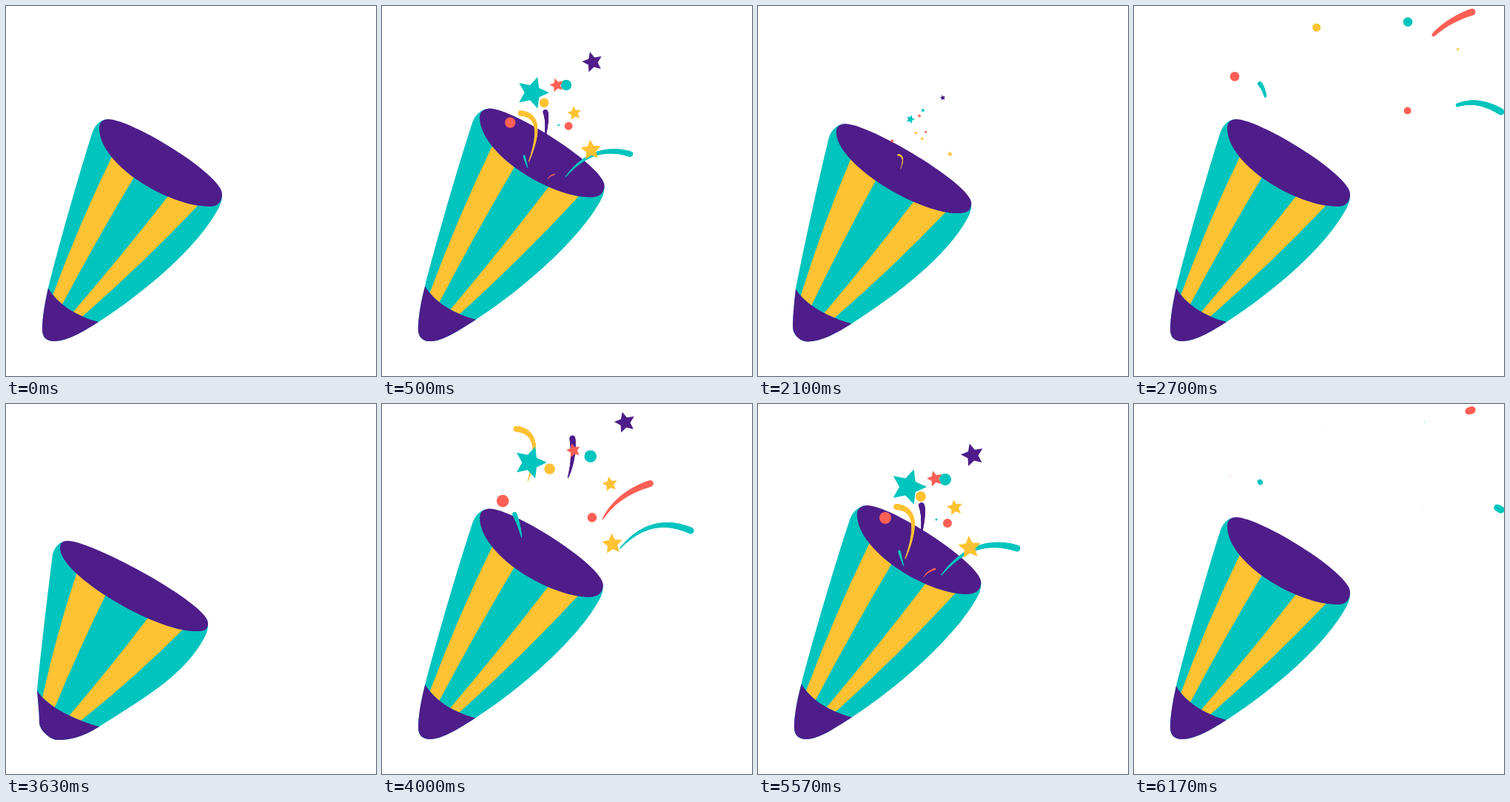
Write an HTML page with a canvas that moves like this. It is 500 px wide and 500 px high and loops after 6.63 s.

```html
<!DOCTYPE html>
<html lang="en">
<head>
<meta charset="utf-8">
<title>Party popper</title>
<style>
html, body { margin: 0; width: 100%; height: 100%; overflow: hidden; background: #fff; }
canvas { display: block; }
</style>
</head>
<body>
<canvas id="stage" width="500" height="500"></canvas>
<script>
const ctx = document.getElementById('stage').getContext('2d');
const PURPLE = '#4e1d8a', TEAL = '#00c4be', YELLOW = '#ffc233', RED = '#ff5f55';
const LOOP = 6630, BURSTS = [0, 1695, 3375, 5055];

// Cone poses: mouth left, top, right, bottom; tip seam ends; tip left, bottom; rim fullness
const REST = [126,165, 138,153, 292,254, 275,271, 57,381, 125,427, 49,437, 65,453, 50];
const SQUASH = [73,195, 84,185, 273,296, 255,307, 42,387, 126,436, 45,430, 70,454, 36];
const STRETCH = [135,148, 149,136, 302,240, 283,256, 59,378, 127,423, 49,437, 65,453, 50];

// Streamers: colour, width, start, growth time, origin, then tail/bend/head early and late
const STREAMERS = [
  [PURPLE, 8, 410, 105, [220,180], [220,180, 225,150, 221,137], [288,5, 302,-15, 300,-60]],
  [YELLOW, 8, 365, 145, [190,225], [199,209, 225,142, 187,139], [195,-20, 215,-85, 175,-90]],
  [TEAL, 9, 410, 105, [248,231], [248,231, 291,177, 350,195], [408,153, 448,114, 496,143]],
  [RED, 9, 478, 140, [224,234], [224,234, 240,205, 282,192], [385,64, 409,24, 457,8]],
  [TEAL, 6, 431, 140, [197,219], [197,219, 192,205, 187,186], [179,135, 178,115, 170,105]]
];

// Dots: colour, x, y, radius, travel x, travel y
const DOTS = [
  [TEAL, 253,102, 8, 101,-78],
  [YELLOW, 220,125, 7, 23,-93],
  [RED, 172,154, 8, -31,-57],
  [RED, 256,161, 6, 98,-19]
];

// Stars: colour, x, y, radius, travel x, travel y, angle, end time
const STARS = [
  [TEAL, 203,112, 25, -10,-82, 0, 850],
  [PURPLE, 290,69, 16, 135,-110, -105, 900],
  [RED, 239,101, 11, 70,-95, -105, 850],
  [YELLOW, 266,140, 11, 148,-79, -100, 1130],
  [YELLOW, 286,194, 16, 89,-12, -95, 850]
];

const clamp = v => Math.max(0, Math.min(1, v));
const ramp = (ms, from, to) => clamp((ms - from) / (to - from));
const ease = u => (1 - Math.cos(Math.PI * u)) / 2;
const mix = (a, b, u) => a.map((v, i) => v + (b[i] - v) * u);

function bezier([x0, y0, x1, y1, x2, y2, x3, y3], u) {
  const v = 1 - u;
  const at = (a, b, c, d) => v*v*v*a + 3*v*v*u*b + 3*v*u*u*c + u*u*u*d;
  return [at(x0, x1, x2, x3), at(y0, y1, y2, y3)];
}

function shape(color, draw) {
  ctx.fillStyle = color;
  ctx.beginPath();
  draw();
  ctx.fill();
}

function conePose(ms) {
  if (ms < 260) return mix(REST, SQUASH, ease(ms / 260));
  if (ms < 540) return mix(SQUASH, STRETCH, ease((ms - 260) / 280));
  return mix(STRETCH, REST, ease(ramp(ms, 540, 760)));
}

function drawCone(ms) {
  const [lx, ly, tx, ty, rx, ry, bx, by, ax, ay, qx, qy, mx, my, nx, ny, full] = conePose(ms);
  const rim = [bx, by, bx - 55, by, lx, ly + full, lx, ly];
  const seam = [ax, ay, ax + 13, ay + 23, qx - 27, qy - 7, qx, qy];
  const px = lx - 10, py = ly + 8, ex = rx - 4, ey = ry + 18;
  const curve = (...p) => ctx.bezierCurveTo(...p);
  const tipOutline = () => {
    curve(ax + (mx - ax) * .75, ay + 27, mx, my - 12, mx, my);
    curve(mx, my + 11, nx - 10, ny, nx, ny);
    curve(nx + 17, ny, qx - 22, qy + 14, qx, qy);
  };

  shape(TEAL, () => {
    ctx.moveTo(tx, ty);
    curve(tx - 12, ty, px + 3, py - 10, px, py);
    curve(px + (ax - px) * .35, py + (ay - py) * .31, ax + (px - ax) * .2, ay + (py - ay) * .23, ax, ay);
    tipOutline();
    curve(qx + 65, qy - 42, ex - 28, ey + 53, ex, ey);
    curve(rx, ry + 10, rx, ry + 4, rx, ry);
  });

  for (const [m1, m2, s1, s2, bow1, bow2] of [[.74, .54, .14, .36, -4, -2], [.3, .09, .57, .73, 2, 4]]) {
    const top1 = bezier(rim, m1), top2 = bezier(rim, m2);
    const low1 = bezier(seam, s1), low2 = bezier(seam, s2);
    const side = (from, to, bow) => ctx.quadraticCurveTo(
      (from[0] + to[0]) / 2 + bow, (from[1] + to[1]) / 2 + bow * .8, ...to);
    shape(YELLOW, () => {
      ctx.moveTo(...top1);
      side(top1, low1, bow1);
      ctx.lineTo(...bezier(seam, (s1 + s2) / 2));
      ctx.lineTo(...low2);
      side(low2, top2, bow2);
      ctx.lineTo(...bezier(rim, (m1 + m2) / 2 - .04));
    });
  }

  shape(PURPLE, () => {
    ctx.moveTo(ax, ay);
    tipOutline();
    curve(...seam.slice(4, 6), ...seam.slice(2, 4), ax, ay);
  });
  shape(PURPLE, () => {
    ctx.moveTo(lx, ly);
    curve(lx, ly - 8, tx - 7, ty, tx, ty);
    curve(tx + 32, ty, rx, ry - 26, rx, ry);
    curve(rx, ry + 11, bx + 11, by, bx, by);
    curve(...rim.slice(2));
  });
}

function drawStreamer([color, width, start, growth, origin, early, late], ms) {
  const grow = ramp(ms, start, start + growth), cut = ramp(ms, 940, 1125);
  if (!grow || cut === 1) return;
  const travel = 1 - (1 - ramp(ms, 515, 930)) ** 2;
  const path = mix(early.map((v, i) => origin[i % 2] + (v - origin[i % 2]) * grow), late, travel);
  const at = u => [0, 1].map(i =>
    (1 - u) ** 2 * path[i] + 2 * u * (1 - u) * path[i + 2] + u * u * path[i + 4]);
  const size = width * (grow + (1 - grow) * travel);
  ctx.strokeStyle = color;
  ctx.lineCap = 'round';
  const steps = 40;
  for (let i = 0; i < steps; i++) {
    const u = cut + (1 - cut) * i / steps;
    ctx.lineWidth = size * (.15 + .85 * Math.pow(u, .8));
    ctx.beginPath();
    ctx.moveTo(...at(u));
    ctx.lineTo(...at(u + (1 - cut) / steps));
    ctx.stroke();
  }
}

function drawConfetti(ms) {
  const t = (ms - 515) / 415, grow = ramp(ms, 370, 515);
  const across = 1.1 * t - .1 * t * t, up = 1.7 * t - .7 * t * t;
  for (const [color, x, y, r, dx, dy] of DOTS) {
    const size = (r + Math.max(0, t)) * grow * (1 - ramp(ms, 950, 1125));
    shape(color, () => ctx.arc(x + dx * across, y + dy * up, size, 0, 7));
  }
  for (const [color, x, y, r, dx, dy, angle, end] of STARS) {
    const size = r * grow * (1 - ramp(ms, 600, end));
    shape(color, () => {
      for (let i = 0; i < 10; i++) {
        const a = (angle + i * 36) * Math.PI / 180, d = i % 2 ? size * .48 : size;
        ctx.lineTo(x + dx * across + d * Math.cos(a), y + dy * up + d * Math.sin(a));
      }
    });
  }
  if (ms < 600) shape(TEAL, () => ctx.arc(241 + 60 * across, 156 - 80 * up, 1.5 * grow, 0, 7));
}

let began;
function frame(now) {
  began ??= now;
  const time = (now - began) % LOOP;
  const ms = time - BURSTS.findLast(start => start <= time);
  ctx.fillStyle = '#fff';
  ctx.fillRect(0, 0, 500, 500);
  drawCone(ms);
  if (ms > 360 && ms < 1130) {
    STREAMERS.forEach(s => drawStreamer(s, ms));
    drawConfetti(ms);
  }
  requestAnimationFrame(frame);
}
requestAnimationFrame(frame);
</script>
</body>
</html>
```
